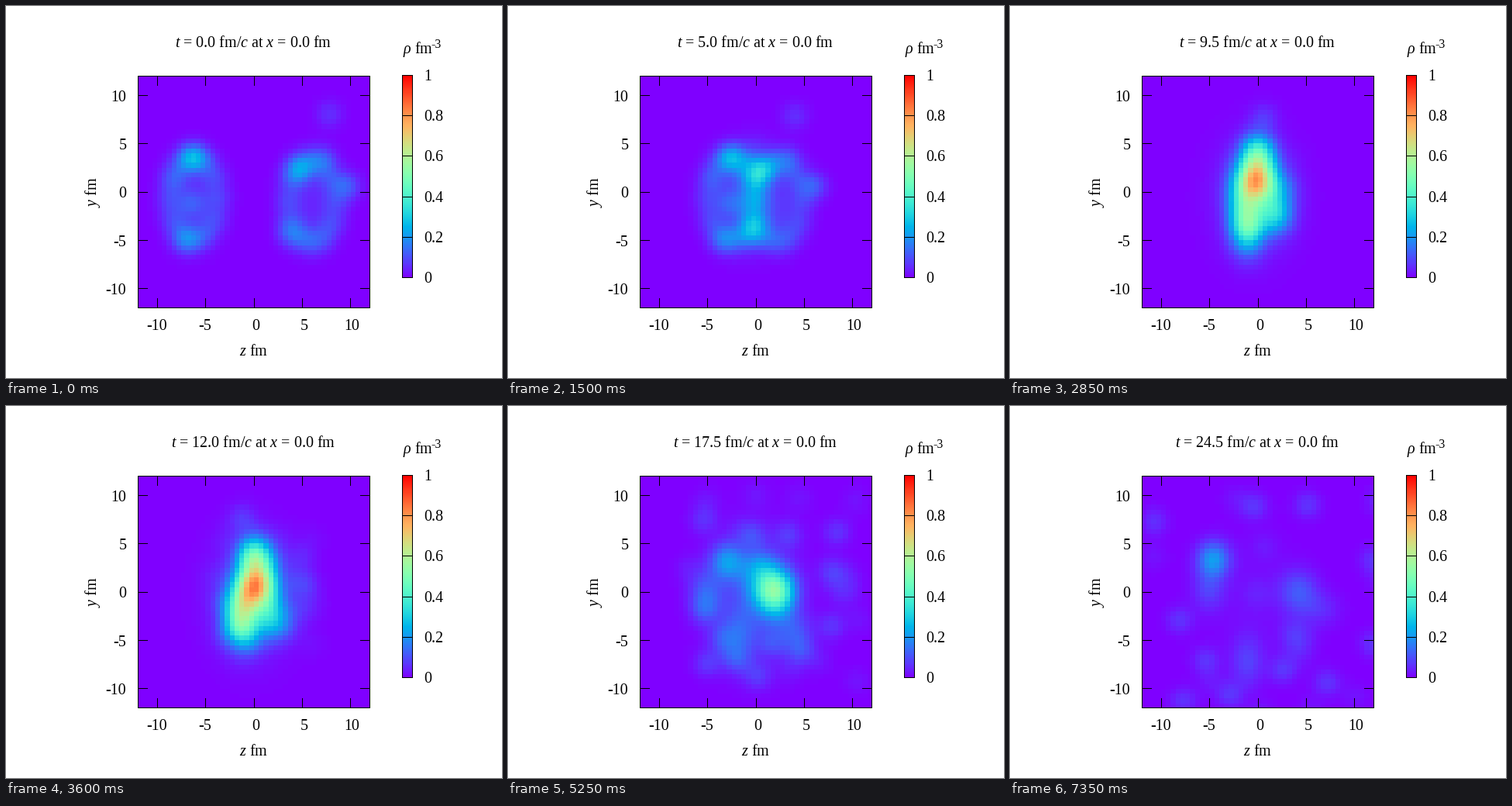
A matplotlib script for the animation above (7.5 s loop, 640x480 px).

```python
import numpy as np
import matplotlib.pyplot as plt
from matplotlib.animation import FuncAnimation

plt.rcParams.update({
    "font.family": "Liberation Serif",
    "font.size": 14.4,
    "mathtext.fontset": "custom",
    "mathtext.rm": "Liberation Serif",
    "mathtext.it": "Liberation Serif:italic",
})

FRAMES, STEP = 50, 0.5
SPEED = 0.74                                # drift of each nucleus, fm per fm/c
LEFT, RIGHT, TOP, BOTTOM = 170, 470, 90, 390
BAR = 511, 525, 89, 351

axis = -11.75 + 0.5 * np.arange(48)
Z, Y = np.meshgrid(axis, axis[::-1])


def smooth(x):
    x = min(max(x, 0), 1)
    return x * x * (3 - 2 * x)


def blob(z, y, a, sz=1, sy=1):
    return a * np.exp(-((Z - z) / sz) ** 2 / 2 - ((Y - y) / sy) ** 2 / 2)


def nucleus(z, y, spots):
    """A soft ring of packets with brighter spots, given relative to its centre."""
    rho = blob(z, y, 0.04, 1.8, 3)
    for angle in np.arange(12) * np.pi / 6:
        rho = rho + blob(z + 2.5 * np.cos(angle), y + 4.3 * np.sin(angle), 0.065)
    return rho + sum(blob(z + dz, y + dy, a) for dz, dy, a in spots)


SPOTS_A = [(-.1, 4.3, .15), (-.9, -4.4, .08), (-.2, -.5, .08), (-2, 2, .03)]
SPOTS_B = [(-1.4, 3.3, .13), (-2.3, -3.3, .08), (3.7, 1.6, .1), (1.2, 4.5, .05)]

# Dense matter: each lump has a width and a path of z, y and density.
TIMES = [7, 12, 15, 20, 24.5]
LUMPS = [
    ((1.4, 1.6), (-.6, .3, .7, 3.3, 4.2), (2, 1, 1, -.9, 0), (.6, .6, .68, .24, .11)),
    ((1.2, 1.3), (-.1, .1, -2.6, -3.4, -4.6), (4.6, 4, 3.7, 2.6, 3.4), (.27, .3, .16, .19, .2)),
    ((1.2, 1.9), (-1, -1.2, -2.2, -1.3, -1.1), (-3.8, -3, -4.8, -4.3, -7.2), (.47, .36, .12, .05, .08)),
    ((1.2, 1.5), (1.7, 2, 3.6, 4.7, 4.2), (-2, -2.4, -3, -5.6, -5.3), (.3, .2, .12, .07, .06)),
    ((1.2, 1.6), (-1.9, -1.2, -2.6, -7.8, -5.1), (0, -.8, -.7, .4, .3), (.16, .15, .14, .08, .08)),
    ((1.4, 1.3), (1, .2, 0, .5, 6.6), (.8, -.5, 3, 1.5, -1.8), (.1, .1, .08, .15, .05)),
]
HALO = (.06, .08, .14, .05, .02)

# Ejected packets, placed where they are at t = 20.
EJECTA = [(-.3, 6.9), (4, 7), (9.9, 7.3), (9.3, 2.6), (9.3, -4.2), (5.6, -7.3),
          (2, -6.3), (.2, -10.3), (-2.3, -8.3), (-6, -8.8), (-4.2, -5.5),
          (-6.3, -2.3)]
rng = np.random.default_rng(4)
FAINT = rng.uniform(-13, 13, (18, 2))


def matter(t):
    rho = blob(-.3, -.5, np.interp(t, TIMES, HALO), 2.9, 4.2)
    for width, *path in LUMPS:
        z, y, a = (np.interp(t, TIMES, p) for p in path)
        rho = rho + blob(z, y, a, *width)
    return rho


def debris(t):
    grow = (max(t, 9) - 4) / 16
    fade = smooth((t - 8) / 7)
    rho = sum(blob(z * grow, y * grow, 0.065 * fade) for z, y in EJECTA)
    return rho + sum(blob(z * grow, y * grow, 0.025 * fade) for z, y in FAINT)


def field(t):
    mix = smooth((t - 4.5) / 2.5)
    rho = mix * matter(t) + debris(t)
    if mix < 1:
        a = nucleus(-6.2 + SPEED * t, -.7, SPOTS_A)
        b = nucleus(6 - SPEED * t, -1, SPOTS_B)
        rho = rho + (1 - mix) * (a + b + 4 * a * b)
    # Two packets cross the whole region undisturbed.
    rho = rho + blob(7.8 - .755 * t, 8 - .03 * t, .06)
    return rho + blob(9.7 - SPEED * t, .5, .1 * mix * (1 - smooth((t - 7) / 5)))


fig = plt.figure(figsize=(6.4, 4.8), dpi=100, facecolor="white")
ax = fig.add_axes([0, 0, 1, 1])
ax.axis("off")

look = dict(cmap="rainbow", vmin=0, vmax=1, aspect="auto",
            interpolation="nearest")
heat = ax.imshow(field(0), extent=(LEFT, RIGHT, BOTTOM, TOP), **look)
ax.imshow(np.linspace(1, 0, 256)[:, None],
          extent=(BAR[0], BAR[1], BAR[3], BAR[2]), **look)
ax.set_xlim(0, 640)
ax.set_ylim(480, 0)


def line(x0, y0, x1, y1):
    """One-pixel line through pixel centres."""
    ax.plot(np.floor([x0, x1]) + .5, np.floor([y0, y1]) + .5, color="black",
            lw=0.72, solid_capstyle="projecting", snap=False)


def box(l, r, t, b):
    for edge in ((l, t, r, t), (l, b, r, b), (l, t, l, b), (r, t, r, b)):
        line(*edge)


def label(x, y, s, ha="center", **kw):
    return ax.text(x, y, s, ha=ha, va="baseline", color="black", **kw)


r, b = RIGHT - 1, BOTTOM - 1
box(LEFT, r, TOP, b)
for v in range(-10, 11, 5):
    part = (v + 12) / 24
    x = LEFT + .5 + part * (r - LEFT)
    y = b + .5 - part * (b - TOP)
    line(x, TOP, x, TOP + 12)
    line(x, b, x, b - 12)
    line(LEFT, y, LEFT + 12, y)
    line(r, y, r - 12, y)
    label(x + (2 if v >= 0 else -.8), 418, str(v))
    label(155.3, y + 7.3, str(v), ha="right")

l, r, t, b = BAR[0], BAR[1] - 1, BAR[2], BAR[3] - 1
box(l, r, t, b)
for i in range(6):
    y = b + .5 - i / 5 * (b - t)
    line(l, y, r, y)
    label(539.5, y + 6.5, f"{i / 5:g}", ha="left")

label(319, 451, "$z$ fm")
label(117, 240, "$y$ fm", rotation=90, rotation_mode="anchor")
label(511.5, 61, r"$\rho$ fm", ha="left")
label(548.5, 54, "-3", ha="left", fontsize=11.5)
title = label(318.7, 53, "")


def update(n):
    t = n * STEP
    heat.set_data(np.clip(field(t), 0, 1))
    title.set_text(f"$t$ = {t:.1f} fm/$c$ at $x$ = 0.0 fm")
    return heat, title


anim = FuncAnimation(fig, update, frames=FRAMES, interval=150, repeat=True,
                     repeat_delay=0, blit=False)
plt.show()
```
